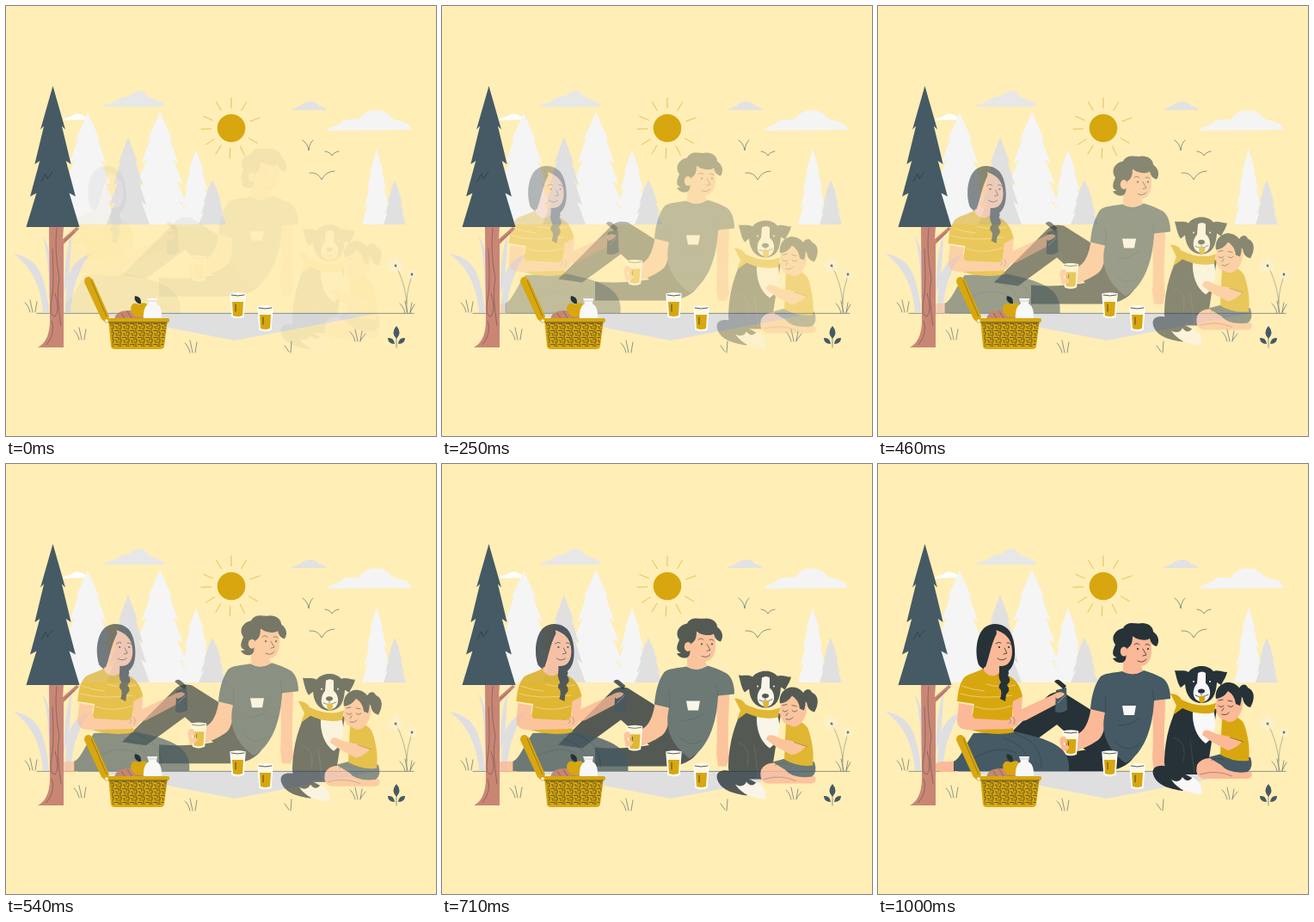
These frames come from a looping animation (500 px wide and 500 px high, 1040 ms). An HTML page:

```html
<!DOCTYPE html>
<html lang="en">
<head>
<meta charset="utf-8">
<title>Picnic</title>
<style>
  html, body { margin: 0; width: 100%; height: 100%; overflow: hidden; background: #ffeeb6; }
  svg { display: block; width: 100%; height: 100%; }
  .ink { fill: #263238; }
  .slate { fill: #455a64; }
  .gold { fill: #d8a70f; }
  .skin { fill: #fbb997; }
  .white { fill: #f8f8f8; }
  .line { fill: none; stroke: #455a64; stroke-width: .6; stroke-linecap: round; }
  .fine { fill: none; stroke: #263238; stroke-width: .8; stroke-linecap: round; }
  .pale { fill: none; stroke: #fff; stroke-width: .6; opacity: .7; }
  .fold { fill: none; stroke: #263238; stroke-width: .6; opacity: .6; }
</style>
</head>
<body>
<svg viewBox="0 0 500 500">
  <defs>
    <pattern id="weave" width="9" height="8" patternUnits="userSpaceOnUse">
      <path d="M0 1.5H5V5M7 0V4H9M1 5H3V8M4.5 7H8V4.5" fill="none" stroke="#3c3a20" stroke-width=".7"/>
    </pattern>
  </defs>

  <g id="sky">
    <path fill="#e7e7e8" d="M113 117C118 112 126 114 130 109C135 104 142 107 147 102C153 97 161 98 164 104C169 110 181 108 185 117Z"/>
    <path fill="#e2e2e3" d="M331 121C336 118 341 117 345 114C351 110 360 110 364 116C368 117 371 118 373 121Z"/>
    <path fill="#f4f4f4" d="M374 145C378 138 387 140 391 134C398 130 406 134 411 131C418 121 428 120 437 122C443 124 446 128 451 132C459 134 469 135 472 144Z"/>
    <path fill="#fff" d="M66 133C70 128 75 130 79 126C85 124 89 127 97 132Z"/>
    <circle cx="262" cy="142" r="16.3" class="gold"/>
    <path id="rays" fill="none" stroke="#d6a30f" stroke-width=".6"/>
    <path class="line" d="M345 156Q351 160 352 168Q353 159 357 156M371 169Q377 170 379 174Q381 170 387 169M353 194Q363 193 367 202Q372 192 382 192"/>
  </g>
  <g id="forest"></g>

  <g id="ground">
    <path fill="#dfdfe0" d="M102 357H434L266 389Z"/>
    <path class="line" d="M36 357.4H474"/>
    <path fill="#dfdfe1" d="M9 288C22 290 34 297 40 310C46 325 49 340 50 357H43C42 340 37 322 28 308C22 299 15 293 9 288ZM98 289C87 291 78 299 74 311C70 325 69 341 69 357H75C76 341 79 324 86 309C89 300 93 294 98 289ZM42 266C48 283 50 310 50 340H56C57 310 52 281 42 266ZM76 265C69 286 68 309 67 335L73 320C74 300 76 282 76 265Z"/>
    <path class="line" opacity=".65" d="M466 356C467 335 461 318 454 303M466 346C466 330 470 322 472 313"/>
    <g id="blooms" opacity=".8"></g>
    <g id="grass" class="line"></g>
    <path class="slate" d="M454 372Q447 380 454 387Q461 380 454 372ZM452 393Q444 393 444 386Q451 385 452 393ZM456 393Q464 393 464 386Q457 385 456 393Z"/>
    <path class="line" d="M454 386V397"/>
  </g>

  <g id="man"><g transform="translate(0 2)">
    <path class="ink" d="M196 269Q203 261 216 264L262 293L276 345L246 335L208 301L163 334L135 330Z"/>
    <path class="ink" d="M178 333C210 336 240 332 266 325L298 338Q288 354 262 355H178Z"/>
    <path class="skin" d="M319 268L334 268C334 295 331 322 334 346L331 355H321L319 340C321 315 319 292 319 268Z"/>
    <path class="skin" d="M248 279L265 284C264 300 264 312 256 319C246 326 236 330 226 333L214 332L211 319L220 313C236 316 245 304 248 279Z"/>
    <path class="slate" d="M284 239C273 241 263 241 258 246C251 256 248 270 247 283L264 287C259 308 264 328 288 346C303 338 319 316 321 273L340 271C340 260 337 251 331 247C324 243 316 240 309 238Q296 246 284 239Z"/>
    <path class="fold" d="M264 288Q266 276 264 267M321 274L319 260M279 302Q294 302 304 293M276 321Q289 335 302 325"/>
    <path class="white" d="M284 279H300L298 290H286Z"/>
    <g transform="translate(0 3)">
      <path class="skin" d="M285 218V236Q296 243 308 235L306 230C317 229 320 216 317 200L300 190L285 201Z"/>
      <path class="ink" d="M278 220C270 218 274 210 276 205C269 195 278 187 285 186C290 176 301 182 307 180C314 180 320 184 320 190C326 194 328 201 324 207C319 206 317 202 316 198C310 202 299 198 296 195C296 203 294 207 290 209L288 222C285 229 276 226 273 221Z"/>
      <ellipse class="skin" cx="286" cy="213" rx="4.2" ry="5.5"/>
      <path class="fine" d="M298 205Q301 202 304 205M311 205Q314 203 316 206M308 210L312 217L308 218M302 224Q308 227 312 222"/>
      <circle class="ink" cx="302" cy="210" r="1.1"/><circle class="ink" cx="314" cy="210" r="1.1"/>
    </g>
    <use href="#glass" x="-45.5" y="-26"/>
    <path class="skin" d="M212 317Q216 312 219 317L220 322H213ZM213 325H221Q224 328 220 331L214 332Z"/>
  </g></g>

  <g id="woman">
    <path class="skin" d="M65 350C71 344 81 347 93 345V358H75Q63 357 65 350Z"/>
    <path class="skin" d="M154 266L168 270L167 285L204 268Q214 262 217 269Q217 275 210 278L172 298Q159 302 157 292Z"/>
    <path class="slate" d="M88 346C96 342 101 327 111 313L158 311C190 318 221 325 222 350V357H88Z"/>
    <path class="fold" d="M110 343C130 331 145 329 161 336M157 313C180 320 190 331 190 354M145 318C167 326 172 336 174 342"/>
    <path class="gold" d="M122 238C113 243 101 245 99 250C94 257 93 267 92 276L112 279C110 291 108 304 108 309Q134 317 158 312C155 300 156 288 157 276L168 270C165 255 157 246 145 244L138 237Z"/>
    <path class="skin" d="M94 278L111 281Q107 291 112 296L150 298L158 292Q166 293 165 300Q161 308 151 308L112 309Q92 311 92 298Z"/>
    <path class="pale" d="M97 258Q111 263 124 264M126 256Q143 261 160 257M95 267Q119 274 156 269M113 282Q133 289 156 281"/>
    <path class="ink" d="M117 233C112 218 115 199 123 191C133 182 149 186 154 196C160 207 161 226 156 235C153 240 149 244 145 242C134 244 121 240 117 233Z"/>
    <path class="skin" d="M137 193C133 203 129 209 127 217L123 223V240Q131 251 141 243V235C150 236 156 230 156 218C156 207 152 198 137 193Z"/>
    <path class="ink" d="M137 190C124 196 122 213 115 220L117 233Q120 238 125 236C129 226 131 211 138 197ZM143 236Q155 239 151 246Q156 252 150 257Q155 263 149 268L148 276L142 273Q144 267 143 263Q138 259 143 254Q138 246 143 236Z"/>
    <path class="fine" d="M137 209Q140 206 143 208M150 208Q153 207 155 210M147 214L150 220L146 221M139 226Q144 230 149 226"/>
    <circle class="ink" cx="141" cy="213" r="1.1"/><circle class="ink" cx="152" cy="213" r="1.1"/>
    <path class="slate" d="M207 263L219 260L220 286Q213 291 206 288Z"/>
    <path class="ink" d="M205 253Q208 249 212 252L219 258L216 262Z"/>
    <path class="pale" d="M209 278L218 269"/>
    <path class="skin" d="M204 268Q212 263 217 267Q215 271 208 273Z"/>
    <path class="fold" d="M152 296Q157 299 152 302M157 294Q161 299 157 303"/>
  </g>

  <g id="friends">
    <path class="ink" d="M344 354C330 348 317 350 320 361C324 374 340 378 354 380L369 367Z"/>
    <path class="white" d="M341 367Q350 372 354 364Q360 372 366 364C373 369 378 374 376 384C361 383 349 379 341 367Z"/>
    <path class="ink" d="M350 278C341 296 334 316 333 344Q332 358 344 361H382L394 285Z"/>
    <path class="white" d="M366 286H390C395 303 391 318 381 325C370 317 365 303 366 286Z"/>
    <path class="fold" style="stroke:#607079" d="M344 318Q360 323 355 346M363 322L368 359"/>
    <path class="ink" d="M361 242C356 239 350 241 345 240C347 247 348 255 352 260L357 256C358 270 365 278 377 278C389 277 393 268 394 254L399 257C402 251 405 247 406 242C400 242 395 239 390 241C383 233 368 233 361 242Z"/>
    <path class="white" d="M372 243Q377 240 381 243L381 255C388 260 389 275 377 277C364 275 365 262 371 255Z"/>
    <ellipse class="ink" cx="376" cy="264" rx="4" ry="2.6"/>
    <path class="fine" d="M376 265V269M369 269Q376 273 384 268"/>
    <path class="gold" d="M373 270H380Q381 278 376 278Q373 277 373 270Z"/>
    <circle class="white" cx="367" cy="253" r="1"/><circle class="white" cx="386" cy="253" r="1"/>
    <path class="gold" d="M353 274Q375 285 393 278L391 289Q373 293 354 284L343 292L347 281L340 267Q349 267 353 274Z"/>
    <path class="skin" d="M371 350Q376 341 389 342L405 353L434 358Q437 366 427 366L378 366Q368 363 371 350Z"/>
    <path class="slate" d="M384 341Q398 337 409 335L433 341Q437 353 430 358Q408 361 399 350Z"/>
    <path class="gold" d="M400 295Q416 289 425 301C430 314 433 330 431 345Q414 347 398 338Z"/>
    <path class="ink" d="M419 268C418 257 427 253 430 260C439 264 438 274 433 283Q425 281 424 272Z"/>
    <path class="skin" d="M397 266C390 279 392 296 404 298Q411 303 418 295C429 282 425 265 410 260Z"/>
    <path class="ink" d="M393 273C391 261 400 253 409 254C421 256 426 266 421 281L416 279Q415 269 407 264Q402 272 393 273Z"/>
    <path class="fine" d="M396 281Q399 284 402 281M407 281Q410 284 413 281M402 284L400 287M400 291Q405 293 408 289M396 275L401 274M407 275L412 276"/>
    <path class="skin" d="M426 319Q419 330 407 333L388 323L377 315Q378 308 385 310L394 314L409 317L414 311Z"/>
    <path class="gold" d="M411 300Q420 297 426 304Q430 312 425 324L409 318Z"/>
    <path class="fold" d="M409 318L425 323M402 344Q393 340 387 345M374 361Q394 355 412 363"/>
  </g>

  <g id="front">
    <path fill="#c98675" d="M50 256H67L66 271L82 257L85 259L67 277V397H37C47 392 51 380 51 366Z"/>
    <path class="fold" d="M59 258Q56 285 62 317Q58 335 64 372M54 282Q56 319 54 335Q49 361 57 361Q63 353 57 334M53 366Q58 380 47 394M68 273L80 263"/>
    <g id="pine"></g>
    <path class="line" style="stroke:#263238" d="M41 204L46 195L48 201L54 193"/>
    <path fill="#c58770" d="M126 365Q127 354 143 354Q158 354 161 365Z"/>
    <path class="fold" d="M134 357L138 363M141 355L146 363M149 355L154 363"/>
    <path class="gold" d="M154 347Q164 342 165 351Q163 363 154 362Q145 360 145 351Q147 343 154 347Z"/>
    <path class="ink" d="M154 346Q148 343 150 337Q158 338 157 346Z"/>
    <path class="white" d="M164 340H176L175 346Q182 350 181 364H160Q159 350 166 346Z"/>
    <path class="line" style="stroke:#bbb" d="M165 343H175"/>
    <path class="gold" d="M91 321Q91 314 97 315L101 318L120 361L117 369L111 364Z"/>
    <path class="fold" d="M99 319L117 361"/>
    <path class="gold" d="M119 365H188L184 395Q184 399 179 399H127Q122 399 122 395Z"/>
    <path fill="url(#weave)" d="M121 369H187L183 396H124Z"/>
    <rect class="gold" x="115" y="363" width="75" height="5" rx="2"/>
    <path class="fine" d="M120 368H187"/>
    <circle class="white" cx="117" cy="366" r="1.8"/>
    <g id="glass">
      <path fill="#fff8e2" stroke="#fff" stroke-width="1.4" d="M261 335Q269.500 333 278 335L276 361Q269.500 364 263 361Z"/>
      <path class="gold" d="M263 344H276L275 360Q269.500 362 264 360Z"/>
      <path class="fine" d="M262 336Q269.500 338 277 336M267 347V355"/>
    </g>
    <use href="#glass" x="32" y="15"/>
  </g>
</svg>
<script>
const $ = id => document.getElementById(id);

// Fir silhouette: a bulging cone whose tiers each end in a notch.
function fir(x, top, base, half, tiers, fill) {
  const right = [], left = [];
  for (let i = 1; i <= tiers; i++) {
    const f = (i / tiers) ** 0.85, w = half * f ** 0.65, y = top + (base - top) * f;
    right.push(`${x + w},${y}`);
    left.unshift(`${x - w},${y}`);
    if (i < tiers) {
      right.push(`${x + w * 0.72},${y - 4}`);
      left.unshift(`${x - w * 0.72},${y - 4}`);
    }
  }
  return `<polygon fill="${fill}" points="${x},${top} ${right.join(' ')} ${left.join(' ')}"/>`;
}

const light = '#f5f5f5', grey = '#e0e0e1';
$('forest').innerHTML =
  fir(95, 124, 254, 36, 5, light) + fir(179, 123, 254, 36, 5, light) +
  fir(142, 152, 254, 25, 4, grey) + fir(221, 167, 254, 20, 4, light) +
  fir(240, 202, 254, 16, 4, grey) + fir(431, 166, 254, 17, 4, light) +
  fir(452, 202, 254, 13, 4, grey);
$('pine').innerHTML = fir(54.5, 93, 257, 31, 4, '#455a64');

$('rays').setAttribute('d', [-90, -60, -20, 30, 64, 93, 121, 147, 178, 203, 240].map(deg => {
  const a = deg * Math.PI / 180;
  const at = r => `${262 + r * Math.cos(a)} ${142 + r * Math.sin(a)}`;
  return `M${at(23)}L${at(35.5)}`;
}).join(''));

const tuft = (x, y) =>
  `<path d="M${x - 3} ${y}Q${x - 5} ${y - 8} ${x - 9} ${y - 11}M${x} ${y}L${x - 3} ${y - 14}M${x + 3} ${y}Q${x + 4} ${y - 7} ${x + 5} ${y - 12}"/>`;
$('grass').innerHTML = [[31, 356], [88, 388], [217, 403], [409, 390], [467, 357]]
  .map(([x, y]) => tuft(x, y)).join('') + '<path d="M329 402L324 395M331 403L332 390M412 389L418 381M470 356L475 347"/>';

const bloom = (x, y, r) => Array.from({ length: 8 }, (_, i) =>
  `<ellipse cx="${x}" cy="${y - r * 0.65}" rx="${r * 0.2}" ry="${r * 0.42}" fill="#faf2d4" transform="rotate(${i * 45} ${x} ${y})"/>`
).join('') + `<circle cx="${x}" cy="${y}" r="1.4" class="slate"/>`;
$('blooms').innerHTML = bloom(453, 302, 9) + bloom(472, 312, 6);

const LOOP = 1040, LAST = 24, SHIFT = 20;

function place(id, dx, dy, opacity) {
  $(id).setAttribute('transform', `translate(${dx} ${dy})`);
  $(id).setAttribute('opacity', opacity);
}

// The group fades and slides in at 24 steps a second.
function draw(now) {
  const step = Math.min(LAST, Math.floor((now % LOOP + 4.9) * 0.024));
  const p = (step + 1) / (LAST + 1);
  const away = SHIFT * (1 - p);
  const opacity = 1 - (1 - p) ** 1.2;
  place('man', 0, -away, opacity);
  place('woman', -away, 0, opacity);
  place('friends', 0, away, opacity);
}

let start;
function tick(now) {
  start ??= now;
  draw(now - start);
  requestAnimationFrame(tick);
}
draw(0);
requestAnimationFrame(tick);
</script>
</body>
</html>
```
